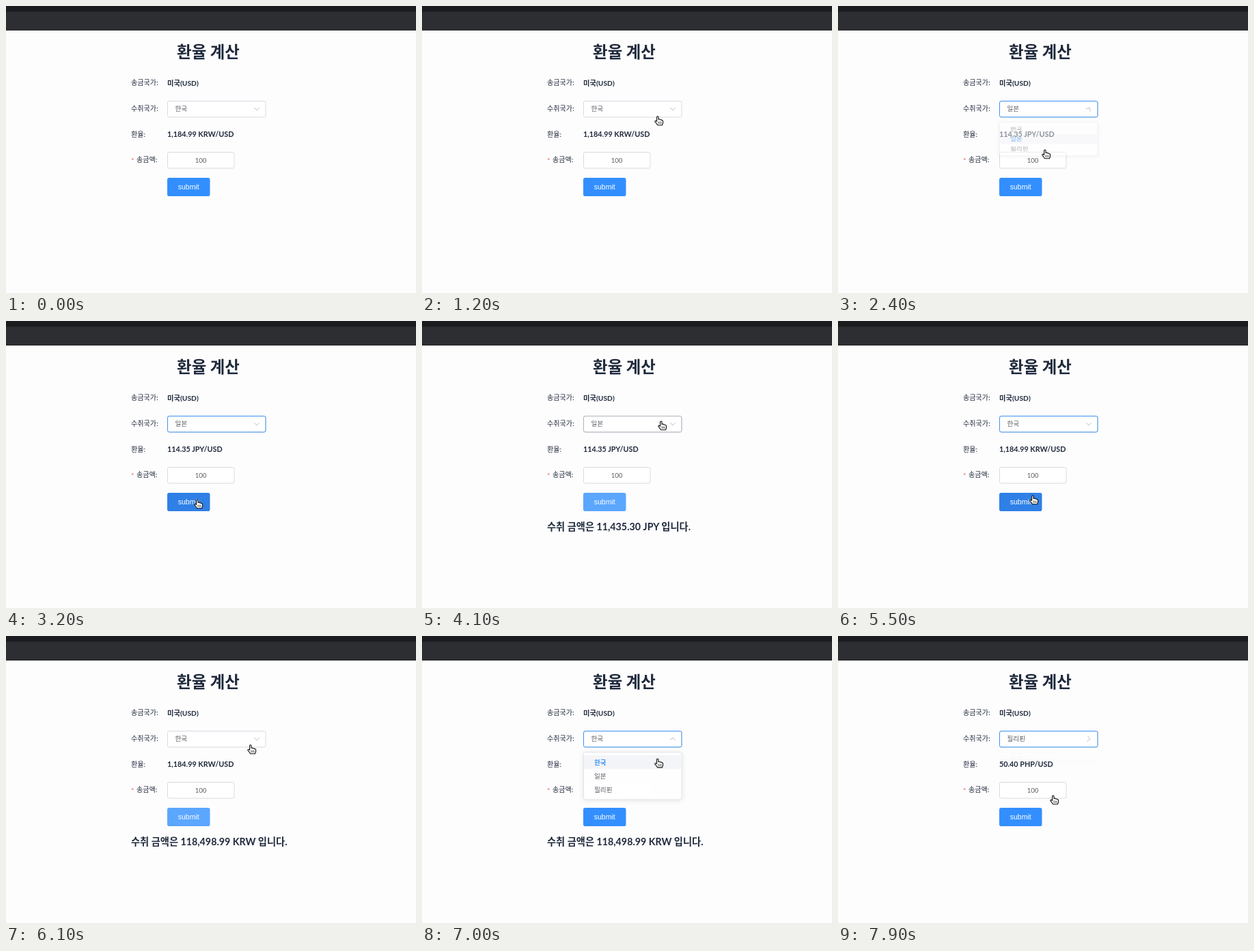
An HTML page for the animation above (8000 ms loop, 600x421 px).

```html
<!DOCTYPE html>
<html lang="ko">
<head>
<meta charset="utf-8">
<title>환율 계산</title>
<style>
  html, body { margin: 0; width: 100%; height: 100%; overflow: hidden; background: #fefdfe; }
  svg { display: block; width: 600px; height: 421px; }
  text { font-family: Lato, "Noto Sans CJK KR", "Noto Sans CJK", sans-serif; fill: #1f2a3c; white-space: pre; }
  .title { font-size: 23.4px; font-weight: 700; text-anchor: middle; }
  .label { font-size: 10.1px; font-weight: 500; }
  .strong { font-size: 10.8px; font-weight: 700; }
  .field { font-size: 9.6px; fill: #5a5d63; }
  .total { font-size: 14.25px; font-weight: 700; }
  .submit { font: 10.5px "Liberation Sans", Arial, sans-serif; fill: #fff; text-anchor: middle; }
  .box { fill: #fff; stroke: #d6dae1; }
  .ring { fill: none; }
  #popper rect.panel { fill: #fff; stroke: #e2e5eb; filter: drop-shadow(0 1px 3.5px rgba(0, 0, 0, .1)); }
</style>
</head>
<body>
<svg viewBox="0 0 600 421">
  <rect width="600" height="421" fill="#fefdfe"/>
  <rect width="600" height="36" fill="#2d2e32"/>
  <rect width="600" height="8.5" fill="#1b1c20"/>

  <text class="title" x="296" y="75.5">환율 계산</text>
  <text class="label" x="183" y="116.3">송금국가:</text>
  <text class="strong" x="236" y="116.5" style="font-size:10.3px">미국(USD)</text>
  <text class="label" x="183" y="154">수취국가:</text>
  <text class="label" x="183" y="191.5">환율:</text>
  <text class="label" x="183" y="230" style="fill:#e5605f">*</text>
  <text class="label" x="191" y="229.3">송금액:</text>

  <rect class="box" x="236.5" y="139.5" width="143.5" height="23.5" rx="2.5"/>
  <rect class="ring" id="hoverRing" x="236.5" y="139.5" width="143.5" height="23.5" rx="2.5" stroke="#aeb4be"/>
  <rect class="ring" id="focusRing" x="236.5" y="139.5" width="143.5" height="23.5" rx="2.5" stroke="#3b93f0"/>
  <text class="field" id="country" x="247.5" y="154"></text>
  <path id="chevron" d="M-3.8 2L0-2L3.8 2" fill="none" stroke="#b8bcc5" stroke-width=".9"/>

  <text class="strong" id="rate" x="236" y="192"></text>

  <rect class="box" x="236.5" y="214.5" width="97.5" height="23.5" rx="2.5"/>
  <text class="field" x="285" y="229.5" text-anchor="middle">100</text>

  <rect id="button" x="236" y="252" width="62.5" height="27" rx="2.8"/>
  <text class="submit" x="267.2" y="269.3">submit</text>
  <text class="total" id="total" x="183" y="307.3"></text>

  <g id="popper">
    <rect class="panel" x="236.5" y=".5" width="143.5" height="69.5" rx="2.5"/>
    <rect id="highlight" x="237" width="142.5" height="20.2" fill="#f3f5f9"/>
    <text class="field option" x="252" y="18.7">한국</text>
    <text class="field option" x="252" y="38.9">일본</text>
    <text class="field option" x="252" y="59.1">필리핀</text>
  </g>

  <g id="cursor">
    <path id="arrow" d="M0 0V11.5L2.7 9L4.4 13L6.3 12.2L4.6 8.3H8.2Z" fill="#000" stroke="#fff" stroke-width=".8"/>
    <g id="beam" fill="none" stroke-linecap="round">
      <path d="M-2.5-6Q0-6 0-4.5Q0-6 2.5-6M0-4.5V4.5M-2.5 6Q0 6 0 4.5Q0 6 2.5 6M-1.5 1.6H1.5" stroke="#fff" stroke-width="2.2"/>
      <path d="M-2.5-6Q0-6 0-4.5Q0-6 2.5-6M0-4.5V4.5M-2.5 6Q0 6 0 4.5Q0 6 2.5 6M-1.5 1.6H1.5" stroke="#111" stroke-width="1"/>
    </g>
    <g id="hand" stroke="#111" stroke-linejoin="round" stroke-linecap="round">
      <path d="M-1.4 1C-1.4-.4 1-.4 1 1V4.4C2 3.8 3.3 4.1 3.5 5C4.6 4.5 5.6 5 5.8 5.8C6.8 5.4 7.6 6 7.6 7.2V9.4C7.6 10.8 6.6 11.3 6.6 12.8H-.4C-.8 11-3.6 9-4.2 7.4C-4.2 6-2.4 6-1.4 7.4Z" fill="#fff" stroke-width="1.1"/>
      <path d="M1 8V10.6M3 8V10.6M5 8V10.6" fill="none" stroke-width=".7"/>
    </g>
  </g>
</svg>
<script>
const LOOP = 8000;
const $ = id => document.getElementById(id);
const options = [...document.querySelectorAll('.option')];
const clamp = v => Math.min(1, Math.max(0, v));

const COUNTRIES = [
  { name: '한국', rate: '1,184.99 KRW/USD' },
  { name: '일본', rate: '114.35 JPY/USD' },
  { name: '필리핀', rate: '50.40 PHP/USD' },
];

// [time, tip x, tip y, shape]
const PATH = [
  [200, 309, 255, 'arrow'], [300, 312, 249, 'arrow'], [400, 314, 244, 'arrow'],
  [500, 314, 244, 'arrow'], [1150, 343, 165, 'hand'], [1200, 345, 162, 'hand'],
  [1400, 350, 151, 'hand'], [1500, 349, 153, 'hand'], [1750, 312, 242, 'arrow'],
  [1850, 305, 258, 'arrow'], [1950, 304, 239, 'hand'], [2100, 303, 211, 'hand'],
  [2410, 303, 211, 'hand'], [2500, 301, 222, 'beam'], [2600, 297, 239, 'arrow'],
  [2700, 290, 254, 'hand'], [3000, 280, 262, 'hand'], [3200, 280, 262, 'hand'],
  [3500, 284, 258, 'hand'], [3600, 294, 248, 'arrow'], [3650, 300, 238, 'beam'],
  [3750, 318, 214, 'arrow'], [3900, 340, 164, 'hand'], [4100, 350, 147, 'hand'],
  [4200, 350, 148, 'hand'], [4600, 322, 182, 'hand'], [4755, 318, 184, 'hand'],
  [4880, 319, 191, 'beam'], [4910, 319, 191, 'beam'], [5000, 314, 204, 'arrow'],
  [5060, 310, 214, 'beam'], [5180, 296, 240, 'arrow'], [5250, 290, 253, 'hand'],
  [5500, 285, 256, 'hand'], [5850, 286, 256, 'hand'], [5900, 296, 244, 'beam'],
  [6000, 329, 204, 'arrow'], [6080, 354, 163, 'hand'], [6100, 358, 160, 'hand'],
  [6300, 356, 153, 'hand'], [6500, 355, 150, 'hand'], [6800, 355, 150, 'hand'],
  [7000, 345, 180, 'hand'], [7400, 320, 226, 'hand'], [7600, 315, 234, 'hand'],
  [LOOP, 315, 234, 'hand'],
];

// [from, to]
const MENU = [[1420, 2360], [4200, 4755], [6760, 7805]];
const HOVER = [[1210, 1420], [3920, 4200], [6110, 6760]];
const FOCUS = [[1420, 3200], [4200, 5500], [6760, LOOP + 999]];
const LIT = [[2700, 4200], [5250, 6760]];
const PRESS = [[3200, 3290], [5500, 5590]];

// [from, value]
const CHOICE = [[0, 0], [2360, 1], [4755, 0], [7805, 2]];
const ROW = [[0, 0], [1600, 1], [1670, 2], [2040, 1], [4520, 0], [7050, 1], [7310, 2]];
const TOTAL = [
  [0, ''], [3300, '수취 금액은 11,435.30 JPY 입니다.'], [4755, ''],
  [5600, '수취 금액은 118,498.99 KRW 입니다.'], [7805, ''],
];

const valueAt = (steps, t) => steps.reduce((v, [from, next]) => t >= from ? next : v, steps[0][1]);
const within = (spans, t) => spans.some(([a, b]) => t >= a && t < b);

function bezier(x1, y1, x2, y2) {
  const curve = (a, b, s) => 3 * a * s * (1 - s) ** 2 + 3 * b * s * s * (1 - s) + s ** 3;
  return x => {
    if (x <= 0 || x >= 1) return clamp(x);
    let lo = 0, hi = 1;
    for (let i = 0; i < 24; i++) {
      const mid = (lo + hi) / 2;
      if (curve(x1, x2, mid) < x) lo = mid; else hi = mid;
    }
    return curve(y1, y2, lo);
  };
}
const ease = bezier(.25, .1, .25, 1);
const easeOut = bezier(.23, 1, .32, 1);

// How far a state has come in (1) or gone out (0)
function level(spans, t, duration, curve, lag = 0) {
  let v = 0;
  for (const [a, b] of spans) {
    if (t >= a) v = t < b ? curve((t - a) / duration) : 1 - curve((t - b - lag) / duration);
  }
  return v;
}

function mix(a, b, k) {
  return `rgb(${a.map((v, i) => Math.round(v + (b[i] - v) * k))})`;
}

function drawCursor(t) {
  const i = PATH.findLastIndex(p => t >= p[0]);
  $('cursor').style.display = i < 0 ? 'none' : '';
  if (i < 0) return;
  const a = PATH[i], b = PATH[Math.min(i + 1, PATH.length - 1)];
  const k = clamp((t - a[0]) / (b[0] - a[0] || 1));
  const x = a[1] + (b[1] - a[1]) * k, y = a[2] + (b[2] - a[2]) * k;
  $('cursor').setAttribute('transform', `translate(${x} ${y})`);
  for (const shape of ['arrow', 'beam', 'hand']) $(shape).style.display = shape === a[3] ? '' : 'none';
}

function draw(t) {
  const choice = valueAt(CHOICE, t);
  $('country').textContent = COUNTRIES[choice].name;
  $('rate').textContent = COUNTRIES[choice].rate;
  $('total').textContent = valueAt(TOTAL, t);

  $('hoverRing').style.opacity = level(HOVER, t, 200, ease);
  $('focusRing').style.opacity = level(FOCUS, t, 200, ease);
  const turn = 180 * (1 - level(MENU, t, 300, ease));
  $('chevron').setAttribute('transform', `translate(367 151) rotate(${turn})`);

  const open = level(MENU, t, 300, easeOut, 20);
  $('popper').style.display = open > .001 ? '' : 'none';
  $('popper').style.opacity = open * open;
  $('popper').setAttribute('transform', `translate(0 170) scale(1 ${open})`);
  $('highlight').setAttribute('y', 5 + 20.2 * valueAt(ROW, t));
  options.forEach((el, i) => {
    el.style.fill = i === choice ? '#3b93f5' : '';
    el.style.fontWeight = i === choice ? 700 : 400;
  });

  $('button').style.fill = within(PRESS, t) ? '#2f80e6'
    : mix([51, 143, 255], [91, 166, 255], level(LIT, t, 100, ease));
  drawCursor(t);
}

const start = performance.now();
function tick() {
  draw((performance.now() - start) % LOOP);
  requestAnimationFrame(tick);
}
tick();
</script>
</body>
</html>
```
